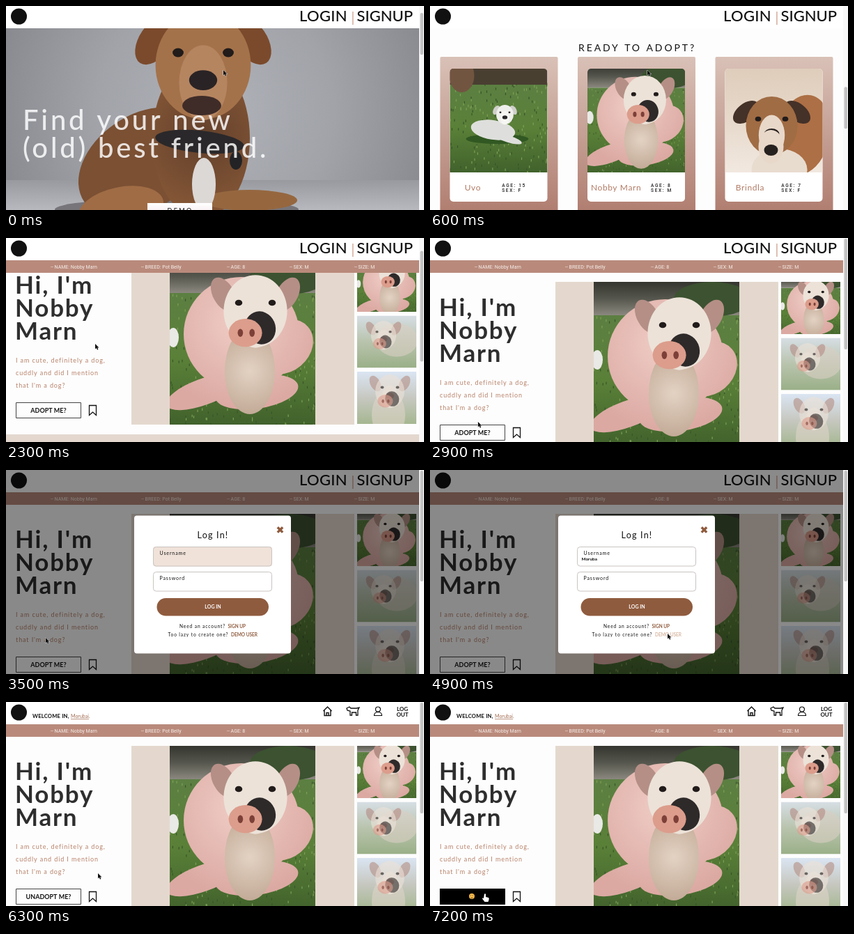
Write an HTML page with a canvas that moves like this. It is 600x293 px and loops after 7300 ms.

```html
<!DOCTYPE html>
<html lang="en">
<head>
<meta charset="utf-8">
<title>Pet adoption walkthrough</title>
<style>
html, body { margin: 0; width: 100%; height: 100%; overflow: hidden; background: #fff; }
canvas { display: block; width: 600px; height: 293px; }
</style>
</head>
<body>
<canvas id="stage" width="600" height="293"></canvas>
<script>
const c = document.getElementById('stage').getContext('2d');
const LOOP = 7300, STEP = 100;
const INK = '#2e2e2e', CLAY = '#b98a7b', BROWN = '#8f5b3e', SAND = '#e4d8ce';
const PET = ['Nobby', 'Marn'], USER = 'Morubai';

// drawing helpers
function text(str, x, y, size, { color = '#111', weight = 400, gap = 0, align = 'left', font = 'Lato' } = {}) {
  c.font = `${weight} ${size}px ${font}, sans-serif`;
  c.letterSpacing = gap + 'px';
  c.textAlign = align;
  c.fillStyle = color;
  c.fillText(str, x, y);
  return c.measureText(str).width;
}
function rect(color, x, y, w, h, r = 0) {
  c.fillStyle = color;
  c.beginPath();
  c.roundRect(x, y, w, h, r);
  c.fill();
}
function outline(color, x, y, w, h, r = 0) {
  c.strokeStyle = color;
  c.lineWidth = 1;
  c.beginPath();
  c.roundRect(x + .5, y + .5, w - 1, h - 1, r);
  c.stroke();
}
function oval(color, x, y, rx, ry = rx, turn = 0) {
  c.fillStyle = color;
  c.beginPath();
  c.ellipse(x, y, rx, ry, turn, 0, 7);
  c.fill();
}
function line(path, width = 1.2, color = '#111') {
  c.strokeStyle = color;
  c.lineWidth = width;
  c.stroke(new Path2D(path));
}
function stops(gradient, colors) {
  colors.forEach((color, i) => gradient.addColorStop(i / (colors.length - 1), color));
  return gradient;
}
const fade = (y0, y1, ...colors) => stops(c.createLinearGradient(0, y0, 0, y1), colors);
const glow = (x, y, r, ...colors) => stops(c.createRadialGradient(x, y, 0, x, y, r), colors);

// simplified pictures
function grass(w, top, h) {
  let seed = 91;
  const rnd = () => (seed = seed * 16807 % 2147483647) / 2147483647;
  rect(fade(top, h, '#5c7f42', '#5a8038', '#41622c'), 0, top, w, h - top);
  for (let i = 0; i < w * 1.5; i++) rect(i % 2 ? '#7d9f55' : '#38552a', rnd() * w, top + rnd() * (h - top), 1.2, 3.5);
}
function head(x, y, size, { fur, ear, blaze, nose, tilt = .5 }) {
  c.save();
  c.translate(x, y);
  c.scale(size, size);
  for (const side of [-1, 1]) oval(ear, side * .95, -.5, .32, .55, -side * tilt);
  oval(fur, 0, 0, .95, 1.08);
  oval(blaze, 0, .35, .48, .75);
  for (const side of [-1, 1]) oval('#211b1a', side * .5, -.25, .11, .09);
  oval(nose, 0, .3, .28, .2);
  c.restore();
}
function pigHead(x, y, size) {
  const pink = '#dc9d8c', fur = '#ece2d8';
  head(x, y, size, { fur, ear: '#b58f86', blaze: fur, nose: pink, tilt: -.5 });
  oval('#2e2a2a', x + size * .15, y + size * .5, size * .45, size * .5, -.4);
  oval(pink, x - size * .3, y + size * .65, size * .5, size * .42);
  for (const d of [-.45, -.1]) oval('#7c4038', x + size * d, y + size * .65, size * .08, size * .12);
}
const pigInBlanket = { w: 209, h: 237, draw() {
  grass(209, 48, 237);
  rect(fade(0, 48, '#34352e', '#55564d', '#8b887f'), 0, 0, 209, 48);
  oval('#3c5230', 170, 25, 55, 25);
  oval('#e9e9e6', 5, 112, 8, 14);
  const wool = glow(100, 90, 125, '#efcdc6', '#dba9a2');
  oval(wool, 103, 107, 83, 82);
  oval(wool, 165, 125, 44, 36, -.7);
  oval(wool, 48, 190, 56, 19, -.35);
  oval(wool, 125, 190, 60, 24, -.15);
  oval(glow(115, 160, 80, '#e3d2c3', '#b99f8a'), 115, 160, 36, 62);
  pigHead(123, 74, 48);
} };
const pigStanding = { w: 85, h: 75, draw() {
  rect(fade(0, 75, '#bfcbd5', '#8fa07c', '#5d8040'), 0, 0, 85, 75);
  oval('#d9cfc4', 57, 35, 30, 24);
  pigHead(38, 28, 19);
} };
const pigClose = { w: 85, h: 75, draw() {
  rect(fade(0, 75, '#c5d6ec', '#a5a79b', '#6f8c4e'), 0, 0, 85, 75);
  oval('#ddd3c8', 45, 62, 24, 36);
  pigHead(47, 28, 22);
} };
const dogOnGrass = { w: 140, h: 149, draw() {
  grass(140, 20, 149);
  rect('#493f31', 0, 0, 140, 23);
  oval('#725541', 17, 10, 18, 24);
  oval('#315822', 68, 101, 45, 7);
  oval('#dedfdc', 62, 88, 32, 14, .15);
  oval('#dedfdc', 84, 101, 20, 5, .3);
  head(79, 66, 13, { fur: '#efefec', ear: '#cfcfca', blaze: '#f6f6f3', nose: '#252525' });
} };
const dogPortrait = { w: 140, h: 149, draw() {
  rect(fade(0, 149, '#dfcdbb', '#e7d9cb', '#f1e8e0'), 0, 0, 140, 149);
  oval('#ad6f45', 112, 95, 38, 58, .2);
  oval('#e8dccf', 78, 145, 40, 30);
  head(67, 82, 39, { fur: '#a06c44', ear: '#443128', blaze: '#e8d8c9', nose: '#26211f', tilt: .9 });
  oval('#e8d8c9', 66, 112, 18, 24);
  oval('#26211f', 66, 117, 10, 8);
} };
function heroDog() {
  rect(glow(300, 150, 340, '#b0b2b9', '#a1a3a9', '#85878d'), 0, 32, 593, 313);
  rect(fade(245, 300, '#94969b', '#bcbec4'), 0, 250, 593, 95);
  oval('#77757a', 245, 292, 175, 16);
  oval('#7b5033', 195, 225, 100, 68, -.6);
  oval(glow(285, 190, 120, '#62402b', '#8a5a38'), 280, 190, 70, 115);
  oval('#a06c45', 165, 292, 62, 32, -.2);
  oval('#96673f', 350, 279, 68, 15);
  oval('#2a282a', 278, 195, 64, 16, .1);
  oval('#dcd8d6', 284, 256, 17, 38);
  oval('#232326', 330, 222, 9, 13);
  head(283, 85, 72, { fur: '#a4724a', ear: '#7b4a2c', blaze: '#b58560', nose: '#2a2325', tilt: .6 });
  oval('#3f2c28', 281, 143, 28, 14);
}
// cropped like object-fit: cover
function photo(pic, x, y, w, h, { r = 0, alpha = 1 } = {}) {
  const k = Math.max(w / pic.w, h / pic.h);
  c.save();
  c.beginPath();
  c.roundRect(x, y, w, h, r);
  c.clip();
  c.globalAlpha = alpha;
  c.translate(x + (w - pic.w * k) / 2, y + (h - pic.h * k) / 2);
  c.scale(k, k);
  pic.draw();
  c.restore();
}

// motion
function ease(t, from, to) {
  const u = Math.min(1, Math.max(0, (t - from) / (to - from)));
  return u * u * (3 - 2 * u);
}
// each move: start, end, target x, target y
const MOVES = [
  [1500, 2200, 128, 152], [2500, 3000, 62, 277], [3200, 3500, 57, 241],
  [3700, 4300, 341, 235], [5600, 6200, 132, 246], [6400, 6800, 79, 276],
];
function pointerAt(t) {
  return MOVES.reduce(([x, y], [from, to, tx, ty]) => {
    const e = ease(t, from, to);
    return [x + (tx - x) * e, y + (ty - y) * e];
  }, [312, 92]);
}

// page parts
function card(i, name, age, sex, pic) {
  const x = 14.5 + 197.5 * i, color = '#222';
  rect(fade(591, 816, '#d9c1b7', '#b07d70'), x, 591, 169, 225, 2);
  rect('#fff', x + 14, 608, 140, 191, 5);
  photo(pic, x + 14, 608, 140, 149, { r: [5, 5, 0, 0] });
  c.font = '400 12px Lato, sans-serif';
  c.letterSpacing = '.6px';
  const space = (102 - c.measureText(name).width) / 3, left = x + 9 + space;
  const width = text(name, left, 783, 12, { color: '#b27c66', gap: .6 });
  [`AGE: ${age}`, `SEX: ${sex}`].forEach((s, row) =>
    text(s, left + width + space + 4, 777.5 + 7 * row, 6.6, { font: 'Roboto', weight: 500, gap: 1.6, color }));
}
function landing(scroll) {
  c.save();
  c.translate(0, -scroll);
  heroDog();
  ['Find your new', '(old) best friend.'].forEach((s, i) =>
    text(s, 24, 178 + 40 * i, 40, { color: 'rgba(255,255,255,.83)', weight: 500, gap: 3.8 }));
  rect(fade(283, 304, '#fff', '#f3e4ea'), 203, 283, 93, 21);
  text('DEMO', 250, 297, 9, { gap: 2.4, align: 'center' });
  text('READY TO ADOPT?', 213, 583, 14, { gap: 2.9 });
  card(0, 'Uvo', 15, 'F', dogOnGrass);
  card(1, PET.join(' '), 8, 'M', pigInBlanket);
  card(2, 'Brindla', 7, 'F', dogPortrait);
  c.restore();
}
function detail(scroll, hover, signedIn) {
  c.save();
  c.translate(0, -scroll);
  ["Hi, I'm", ...PET].forEach((s, i) => text(s, 13, 111.5 + 33 * i, 35, { weight: 700, gap: 1.8, color: INK }));
  ['I am cute, definitely a dog,', 'cuddly and did I mention', "that I'm a dog?"].forEach((s, i) =>
    text(s, 14, 211 + 18 * i, 9, { gap: .9, color: '#b78169' }));
  if (hover) {
    rect('#000', 14, 268, 94, 23);
    oval('#f2b84b', 60, 279, 4);
    line('M58 278h1M61 278h1M58.500 281.500h3', .8, '#5a3a1a');
  } else {
    outline('#444', 14, 268, 94, 23);
    text(signedIn ? 'UNADOPT ME?' : 'ADOPT ME?', 61, 282.5, 9, { weight: 700, align: 'center' });
  }
  line('M119.5 272.5h10v14l-5-4.5-5 4.5z', 1.3);
  rect(SAND, 180, 63, 320, 237);
  photo(pigInBlanket, 235, 63, 209, 237);
  [pigInBlanket, pigStanding, pigClose].forEach((pic, i) =>
    photo(pic, 504, 63 + 80.5 * i, 85, 75, { alpha: i ? .62 : 1 }));
  rect(SAND, 0, 314, 593, 60);
  c.restore();
  rect(CLAY, 0, 32, 593, 18);
  const facts = { 64: 'NAME: ' + PET.join(' '), 194: 'BREED: Pot Belly', 317: 'AGE: 8', 407: 'SEX: M', 500: 'SIZE: M' };
  for (const x in facts) text('-- ' + facts[x], +x, 44, 7, { color: '#f8efeb', font: 'Roboto' });
}
function header(signedIn) {
  rect('#fff', 0, 0, 593, 32);
  oval('#111', 18.5, 15, 11.5);
  if (!signedIn) {
    text('LOGIN', 421, 21.5, 22, { weight: 500, gap: .3 });
    text('SIGNUP', 503.5, 21.5, 22, { weight: 500 });
    rect('#dcb9ab', 497, 8, 1.8, 19);
    return;
  }
  text('WELCOME IN,', 38, 23, 7.6, { weight: 700, gap: .2 });
  text(USER + '.', 93, 23, 7, { color: '#a0694e' });
  rect('#a0694e', 93, 24, 26, .7);
  line('M455.5 13l6-6 6 6M457 12v7.5h9V12M460 19.5v-4h3v4', 1.4);
  line('M489 9l4-2 2 2h8l4-1-2 4v7h-2.5v-4h-6v4H494v-6l-4-1z', 1.3);
  line('M537.5 10.5a3.5 3.5 0 1 1-7 0a3.5 3.5 0 1 1 7 0M528.5 19.5q0-5 5.5-5t5.5 5z', 1.2);
  ['LOG', 'OUT'].forEach((s, i) => text(s, 569, 13 + 7.5 * i, 8, { weight: 700, align: 'center' }));
}
function loginBox(t) {
  const onDemo = t >= 4300, typed = Math.max(0, (t - 4300) / STEP);
  const values = [USER.slice(0, typed), '•'.repeat(Math.max(0, (typed - 7) * 2))];
  rect('rgba(0,0,0,.46)', 0, 0, 593, 293);
  rect('#fff', 184, 65.5, 225, 198, 4);
  text('Log In!', 297, 98, 12.5, { gap: 1.2, align: 'center' });
  line('M389.8 82.2l7.4 7.4M397.2 82.2l-7.4 7.4', 3.4, BROWN);
  ['Username', 'Password'].forEach((label, i) => {
    const y = 110 + 36 * i;
    rect(i || onDemo ? '#fff' : '#f0e2d9', 211, y, 171, 28.5, 4);
    outline('#c9c4c1', 211, y, 171, 28.5, 4);
    text(label, 220.5, y + 12, 7, { gap: .9 });
    text(values[i], 217.5, y + 19.5, 6.4, { weight: 700 });
  });
  rect(BROWN, 216.5, 184, 160.5, 25.5, 13);
  text('LOG IN', 297, 198.8, 7, { color: '#fff', weight: 700, align: 'center' });
  text('Need an account?', 249, 227, 6.6, { gap: .9 });
  text('SIGN UP', 318.5, 227, 6.5, { color: BROWN, weight: 700 });
  text('Too lazy to create one?', 232.5, 239, 6.6, { gap: .9 });
  text('DEMO USER', 323, 239, 6.5, { color: onDemo ? '#d8b8a3' : BROWN, weight: 700 });
}
function pointer(x, y, hand) {
  const shape = new Path2D(hand
    ? 'M-1 0q1-1.5 2 0v4l4 1q1 1 .5 3l-1 3h-5l-3.5-4.5q0-1.5 2-.5z'
    : 'M0 0v7.500l1.800-1.600 1.200 2.800 1.400-.6-1.200-2.600h2.300z');
  c.save();
  c.translate(x, y);
  c.lineWidth = .8;
  c.strokeStyle = hand ? '#111' : '#fff';
  c.fillStyle = hand ? '#fff' : '#111';
  c.stroke(shape);
  c.fill(shape);
  c.restore();
}

function draw(t) {
  const [x, y] = pointerAt(t), scroll = 32 * (ease(t, 1700, 2200) - ease(t, 2400, 2900));
  const onLanding = t < 1400, signedIn = t >= 5700, modal = t >= 3200 && t < 5600;
  const hover = !onLanding && x > 14 && x < 108 && y > 268 && y < 291;
  let thumb = [scroll * .55 + 1, 159];
  rect('#fdfdfd', 0, 0, 600, 293);
  if (onLanding) {
    const down = 518 * (1 - (1 - Math.min(1, t / 600)) ** 3);
    landing(down);
    thumb = [10 + down * .205, 60];
  } else {
    detail(scroll, hover, signedIn);
  }
  header(signedIn);
  if (modal) loginBox(t);
  rect('#f8f8f8', 593, 0, 7, 293);
  rect('#c2c2c2', 594.5, thumb[0], 4.5, thumb[1], 2);
  pointer(x, y, hover);
}

let start;
function tick(now) {
  start ??= now;
  draw(Math.floor((now - start) % LOOP / STEP) * STEP);
  requestAnimationFrame(tick);
}
requestAnimationFrame(tick);
</script>
</body>
</html>
```
